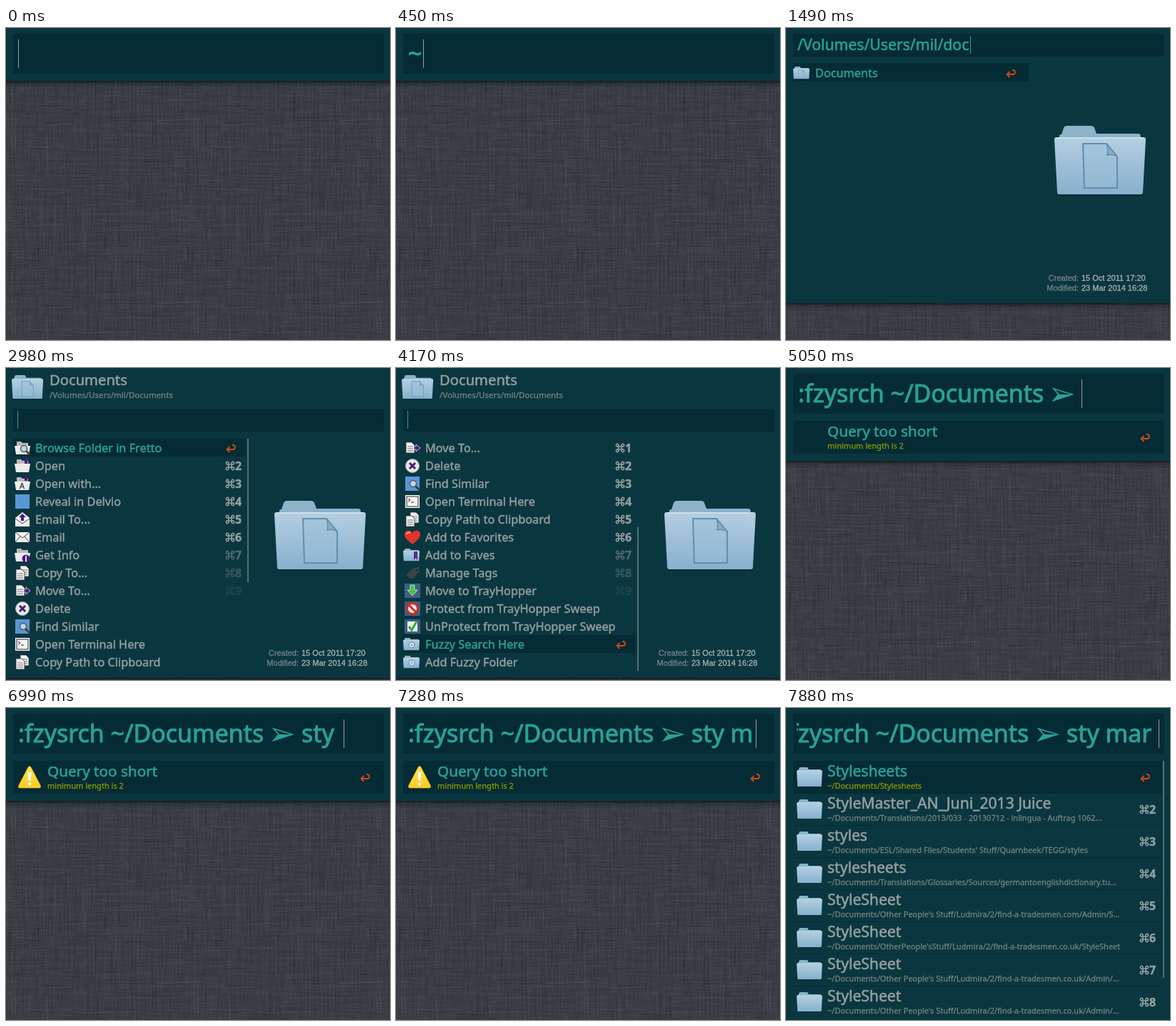
These frames come from a looping animation (538x437 px, 8 s). An HTML page with a canvas:

```html
<!DOCTYPE html>
<html lang="en">
<head>
<meta charset="utf-8">
<title>Launcher: fuzzy folder search</title>
<style>
  html, body { margin: 0; width: 538px; height: 437px; overflow: hidden; background: #383b42; }
  canvas, svg { position: absolute; left: 0; top: 0; display: block; }
  text { font-family: "Noto Sans", "Open Sans", sans-serif; white-space: pre; }
  .date { font-family: "Liberation Sans", Arial, sans-serif; font-size: 11px; }
</style>
</head>
<body>
<canvas id="linen" width="538" height="437"></canvas>
<svg width="538" height="437" viewBox="0 0 538 437">
  <defs>
    <linearGradient id="shade" x2="0" y2="1">
      <stop offset="0" stop-color="#000" stop-opacity=".55"/>
      <stop offset=".4" stop-color="#000" stop-opacity=".2"/>
      <stop offset="1" stop-color="#000" stop-opacity="0"/>
    </linearGradient>
    <linearGradient id="front" x2="0" y2="1">
      <stop offset="0" stop-color="#b4cfe1"/><stop offset="1" stop-color="#87b0cd"/>
    </linearGradient>
    <linearGradient id="sun" x2="0" y2="1">
      <stop offset="0" stop-color="#ffe24f"/><stop offset="1" stop-color="#fbcb22"/>
    </linearGradient>
    <clipPath id="field"><rect x="15" y="8" width="509" height="56"/></clipPath>
    <g id="folder">
      <path d="M5 95h118v3H5z" fill="#021e26" opacity=".6"/>
      <path d="M7 22V14q0-2 3-2l3-9q1-3 5-3h33q4 0 5 3l3 8h58q4 0 4 4v8z" fill="#8db2ca"/>
      <path d="M3 16h122q3 0 3 3l-4 74q0 3-3 3H7q-3 0-3-3L0 19q0-3 3-3z" fill="url(#front)"/>
      <path d="M3 17h122" stroke="#d3e5f0" stroke-width="1.5"/>
    </g>
    <g id="docFolder">
      <use href="#folder"/>
      <path d="M40 25h33l15 18v44H42z" fill="#9cc0d8" fill-opacity=".5" stroke="#5f8eb0" stroke-width="2"/>
      <path d="M73 25q3 8 1 16 8-2 14 2z" fill="#86aecb" stroke="#5f8eb0" stroke-width="1.5"/>
    </g>
    <g id="command" fill="none" stroke-width="1.7">
      <path d="M4 4h4v4H4zM4 4H2.6A1.8 1.8 0 1 1 4 2.4zM8 4V2.4A1.8 1.8 0 1 1 9.4 4zM8 8h1.4A1.8 1.8 0 1 1 8 9.6zM4 8v1.6A1.8 1.8 0 1 1 2.6 8z"/>
    </g>
    <g id="enter" fill="none" stroke="#cb4b16" stroke-width="1.8">
      <path d="M2 8h8q3 0 3-3t-3-3H9"/><path d="M5.500 4l-4 4 4 4"/>
    </g>
  </defs>
  <g id="stage"></g>
</svg>
<script>
const stage = document.getElementById('stage');
const LOOP = 8000;
const PANEL = '#0a3640', DARK = '#052b35', TEAL = '#2aa198', GREY = '#939e9e', DIM = '#74827f', LIME = '#859900';

function drawLinen() {
  let seed = 7;
  const rnd = () => (seed = seed * 16807 % 2147483647) / 2147483647;
  const size = 256, tile = document.createElement('canvas');
  tile.width = tile.height = size;
  const c = tile.getContext('2d');
  c.fillStyle = '#3b3e45';
  c.fillRect(0, 0, size, size);
  for (let i = 0; i < 3600; i++) {
    const x = Math.floor(rnd() * size), y = Math.floor(rnd() * size), len = Math.floor(8 + rnd() * 50);
    const [w, h] = rnd() < .5 ? [len, 1] : [1, len];
    c.fillStyle = rnd() < .6 ? `rgba(0,0,8,${.02 + rnd() * .06})` : `rgba(255,255,255,${.01 + rnd() * .022})`;
    for (const dx of [0, -size]) for (const dy of [0, -size]) c.fillRect(x + dx, y + dy, w, h);
  }
  const out = document.getElementById('linen').getContext('2d');
  out.fillStyle = out.createPattern(tile, 'repeat');
  out.fillRect(0, 0, 538, 437);
}

const rect = (x, y, w, h, fill) => `<rect x="${x}" y="${y}" width="${w}" height="${h}" fill="${fill}"/>`;
// A thin outline gives the sturdier strokes of the interface type
const text = (x, y, size, fill, str, extra = '') =>
  `<text x="${x}" y="${y}" font-size="${size}" fill="${fill}" stroke="${fill}" stroke-width="${size * .028}" ${extra}>${str}</text>`;
const put = (id, x, y, scale = 1) => `<use href="#${id}" transform="translate(${x} ${y}) scale(${scale})"/>`;
const panel = h => rect(0, 0, 538, h, PANEL) + rect(0, h, 538, 10, 'url(#shade)');
const caret = (x, y, h, fill = TEAL) => rect(x, y, 1, h, fill);

const shortcut = (x, y, n, opacity = 1) =>
  `<g opacity="${opacity}"><g stroke="${GREY}">${put('command', x, y - 6)}</g>` +
  text(x + 13, y + 6, 16, GREY, n, 'font-weight="600"') + '</g>';

// Action icons, each about 22 px square
const path = (d, fill, stroke = 'none', width = 1.5) =>
  `<path d="${d}" fill="${fill}" stroke="${stroke}" stroke-width="${width}"/>`;
const disc = (x, y, r, fill, stroke = 'none', width = 1.5) =>
  `<circle cx="${x}" cy="${y}" r="${r}" fill="${fill}" stroke="${stroke}" stroke-width="${width}"/>`;
const whiteFolder = path('M3 5V2h6l2 2h8v4H3z', '#b9bcbc') + path('M0 8h22l-2 12H2z', '#eceeee');
const glass = (x, y) => path(`M${x + 3} ${y + 3}l6 6`, 'none', '#3a3a3a', 2.5) + disc(x, y, 4.5, '#b9d7e8', '#555');
const sheet = (x, y) => path(`M${x} ${y}h8l4 4v11h-12z`, '#f0f0f0', '#333', .8) +
  path(`M${x + 2} ${y + 6}h8m-8 3h8m-8 3h8`, 'none', '#777', 1);
const blueSquare = rect(1, 1, 20, 20, '#5a96d6');
const box = rect(0, 1, 22, 20, '#3f5f83');
const tiny = id => `<g transform="translate(-2 2) scale(.18)"><use href="#${id}"/></g>`;
const icons = {
  browse: whiteFolder + glass(13, 12),
  open: whiteFolder + path('M14 8V4h-3l5-5 5 5h-3v4z', '#4b1a78'),
  openWith: whiteFolder + path('M14 7V4h-3l5-4 5 4h-3v3z', '#4b1a78') + text(7, 18, 11, '#333', 'A'),
  reveal: blueSquare,
  emailTo: path('M1 9L11 1l10 8v12H1z', '#f0f0f0') + path('M1 10l10 7 10-7', 'none', '#444', 1) + path('M9 13V8H6l5-5 5 5h-3v5z', '#4b1a78'),
  email: rect(1, 4, 20, 14, '#f3f3f3') + path('M1 4l10 8 10-8M1 18l7-8m13 8l-7-8', 'none', '#444', 1),
  info: whiteFolder + disc(16, 16, 5.5, '#4b1a78') + text(14.5, 20, 10, '#fff', 'i', 'font-weight="700"'),
  copy: sheet(8, 1) + sheet(2, 6),
  move: sheet(2, 3) + path('M13 9h3V6l6 5-6 5v-3h-3z', '#4b1a78', '#eee', .8),
  remove: disc(11, 11, 9.5, '#e7e7e7', '#aaa', 1) + path('M7 7l8 8m0-8l-8 8', 'none', '#4b1a78', 3),
  similar: blueSquare + glass(12, 11),
  terminal: rect(1, 2, 20, 18, '#fff') + rect(2.5, 3.5, 17, 15, '#222') + rect(3.5, 4.5, 15, 13, '#f5f5f5') +
    path('M5 7l3 2-3 2m4 1h4', 'none', '#222', 1),
  heart: path('M11 21C4 15 0 12 0 7 0 1 8 0 11 5 14 0 22 1 22 7c0 5-4 8-11 14z', '#e0352b') +
    path('M3 7q1-4 5-2', 'none', '#ff9a8a', 2),
  faves: tiny('folder') + path('M13 6h5v12l-2.500-3-2.500 3z', '#5b2a8c'),
  tag: path('M2 14L13 4l7-1 1 6-11 11z', '#3b4345') + disc(17, 7, 1.5, PANEL),
  drawer: box + path('M8 3h6v7h4l-7 8-7-8h4z', '#43c343', '#d9f5d9', .8),
  protect: box + disc(11, 11, 7.5, '#eee', '#d8291f', 3) + path('M6 6l10 10', 'none', '#d8291f', 3),
  unprotect: box + rect(4, 4, 14, 14, '#e9eeee') + path('M6 11l4 5 7-12', 'none', '#2fae35', 3),
  fuzzy: tiny('folder') + disc(10, 12, 4, '#dcebf4', '#6f9ab8', 1.5) + disc(10, 12, 1.6, '#7ca7c4'),
  documents: tiny('docFolder'),
  plain: tiny('folder')
};

function row(index, top, width, icon, label, selected) {
  const y = top + 25 * index;
  const opacity = [1, .5, .32, .13][Math.max(0, index - 5)];
  const key = selected ? put('enter', 308, y + 7) : index < 9 ? shortcut(308, y + 13, index + 1, opacity) : '';
  return (selected ? rect(10, y, width, 25, DARK) : '') +
    `<g transform="translate(12 ${y + 2})">${icons[icon]}</g>` +
    text(41, y + 19, 16.3, selected ? TEAL : GREY, label) + key;
}

function preview(y, kind, created, modified) {
  const line = (dy, label, value) =>
    text(410, y + dy, 11, '#74838a', label, 'class="date" text-anchor="end"') +
    text(414, y + dy, 11, '#a9b3b3', value, 'class="date"');
  return put(kind, 376, y) + line(217, 'Created:', created) + line(231, 'Modified:', modified);
}
const docDates = ['15 Oct 2011 17:20', '23 Mar 2014 16:28'];

function browse(typed, caretX, names) {
  const isDoc = names[0] === 'Documents';
  return panel(385) + rect(10, 8, 520, 32, DARK) +
    text(16, 31, 21.2, TEAL, '/Volumes/Users/mil/' + typed) + caret(caretX, 11, 25) +
    names.map((n, i) => row(i, 50, 330, n === 'Documents' ? 'documents' : 'plain', n, i === 0)).join('') +
    preview(137, isDoc ? 'docFolder' : 'folder', ...(isDoc ? docDates : ['12 Nov 2011 09:42', '20 Mar 2014 20:36']));
}
const home = ['Applications', 'Archive', 'Backups', 'Desktop', 'Documents', 'Downloads', 'Library',
  'Movies', 'Music', 'Pictures', 'Projects', 'Public', 'Sites'];

const actions = [
  ['browse', 'Browse Folder in Fretto'], ['open', 'Open'], ['openWith', 'Open with...'],
  ['reveal', 'Reveal in Delvio'], ['emailTo', 'Email To...'], ['email', 'Email'], ['info', 'Get Info'],
  ['copy', 'Copy To...'], ['move', 'Move To...'], ['remove', 'Delete'], ['similar', 'Find Similar'],
  ['terminal', 'Open Terminal Here'], ['copy', 'Copy Path to Clipboard'], ['heart', 'Add to Favorites'],
  ['faves', 'Add to Faves'], ['tag', 'Manage Tags'], ['drawer', 'Move to TrayHopper'],
  ['protect', 'Protect from TrayHopper Sweep'], ['unprotect', 'UnProtect from TrayHopper Sweep'],
  ['fuzzy', 'Fuzzy Search Here'], ['fuzzy', 'Add Fuzzy Folder']
];

function actionList(first, selected, caretOn) {
  const visible = 13, unit = 325 / actions.length;
  return panel(434) + put('docFolder', 8, 10, .345) +
    text(61, 24, 20.2, GREY, 'Documents') + text(61, 42, 11.5, DIM, '/Volumes/Users/mil/Documents') +
    rect(10, 57, 520, 32, DARK) + (caretOn ? caret(16, 60, 25) : '') +
    actions.slice(first, first + visible)
      .map(([icon, label], i) => row(i, 99, 326, icon, label, first + i === selected)).join('') +
    rect(338, 99 + first * unit, 2, visible * unit, '#56706f') +
    preview(186, 'docFolder', ...docDates);
}

const bigField = (content, caretX) => rect(10, 8, 520, 56, DARK) +
  `<g clip-path="url(#field)">${content}</g>` + (caretX ? caret(caretX, 16, 40, '#8fa3a3') : '');

const command = (arg, caretX, shift = 0) => bigField(
  `<g transform="translate(${shift} 0)">` + text(17, 48, 33.9, TEAL, ':fzysrch ~/Documents') +
  path('M375 29l26 8-26 8.500 7-8.500z', 'none', TEAL, 1.8) + path('M382 37h19l-26 8.500z', TEAL) +
  text(414, 48, 33.9, TEAL, arg) + '</g>', caretX);

const warning = path('M31 83q2-3 4 0l13 25q2 4-2 4H20q-4 0-2-4z', 'url(#sun)', '#f0b81c', .6) +
  path('M30.500 90h5l-1 12h-3z', '#fff') + disc(33, 106.5, 2.3, '#fff');

const tooShort = (arg, caretX, icon = true) => panel(130) + command(arg, caretX) + rect(10, 74, 520, 46, DARK) +
  (icon ? warning : '') + text(58, 95.5, 20.7, TEAL, 'Query too short') +
  text(58, 112.5, 11.05, LIME, 'minimum length is 2') + put('enter', 496, 91);

const others = "Other People's Stuff/Ludmira/2/find-a-tradesmen";
const matches = [
  ['Stylesheets', 'Stylesheets'],
  ['StyleMaster_AN_Juni_2013 Juice', 'Translations/2013/033 - 20130712 - inlingua - Auftrag 1062...'],
  ['styles', "ESL/Shared Files/Students' Stuff/Quarnbeek/TEGG/styles"],
  ['stylesheets', 'Translations/Glossaries/Sources/germantoenglishdictionary.tu...'],
  ['StyleSheet', others + '.com/Admin/S...'],
  ['StyleSheet', "OtherPeople'sStuff/Ludmira/2/find-a-tradesmen.co.uk/StyleSheet"],
  ['StyleSheet', others + '.co.uk/Admin/...'],
  ['StyleSheet', others + '.co.uk/Admin/...']
];

function results(list, arg, shift, barHeight) {
  return panel(444) + command(arg, 522, shift) + list.map(([title, where], i) => {
    const y = 74 + 45 * i, on = i === 0;
    return rect(10, y, 516, on ? 45 : 1, DARK) + put('folder', 15, y + 9, .28) +
      text(58, y + 21.5, 21.1, on ? TEAL : GREY, title) +
      text(58, y + 38.5, 11, on ? LIME : DIM, '~/Documents/' + where) +
      (on ? put('enter', 496, y + 17) : shortcut(496, y + 23, i + 1));
  }).join('') + rect(528, 74, 2, barHeight, '#56706f');
}

const scenes = [
  [0, () => panel(74) + bigField('', 17)],
  [450, () => panel(74) + bigField(text(17, 48, 33.9, TEAL, '~'), 38)],
  [590, () => browse('', 222, home)],
  [1040, () => browse('d', 235, ['Desktop', 'Documents', 'Downloads'])],
  [1190, () => browse('do', 248, ['Documents', 'Downloads'])],
  [1490, () => browse('doc', 258, ['Documents'])],
  [1940, () => actionList(0, 0, true)],
  [2390, () => actionList(0, 0, false)],
  [2980, () => actionList(0, 0, true)],
  [3280, () => actionList(8, 20, true)],
  [3580, () => actionList(8, 20, false)],
  [3870, () => actionList(8, 19, false)],
  [4170, () => actionList(8, 19, true)],
  [4610, () => ''],
  [4910, () => panel(74) + command('', 414)],
  [5050, () => tooShort('', 414, false)],
  [5200, () => tooShort('', 414)],
  [5500, () => tooShort('', 0)],
  [6100, () => tooShort('', 414)],
  [6540, () => tooShort('s', 431)],
  [6690, () => tooShort('st', 443)],
  [6840, () => tooShort('sty', 463)],
  [6990, () => tooShort('sty ', 473)],
  [7280, () => tooShort('sty m', 504)],
  [7430, () => results([...matches.slice(1), matches[0]], 'sty ma', 0, 240)],
  [7880, () => results(matches, 'sty mar', -21, 304)]
];

let shown = null;
function render(time) {
  const scene = scenes.filter(([start]) => start <= time).pop();
  if (scene === shown) return;
  shown = scene;
  stage.innerHTML = scene[1]();
}

function tick() {
  render(performance.now() % LOOP);
  requestAnimationFrame(tick);
}

drawLinen();
tick();
</script>
</body>
</html>
```
